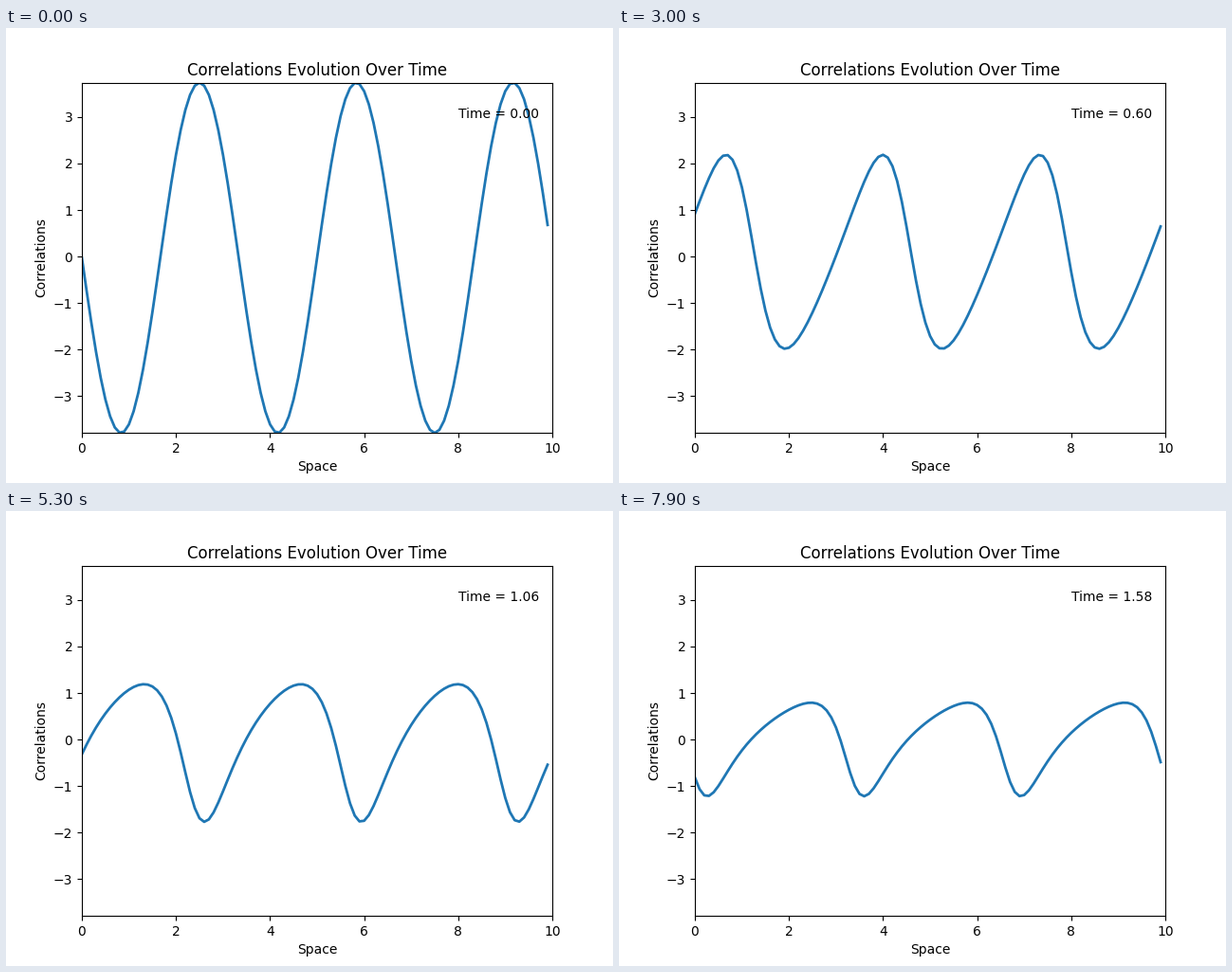
A matplotlib script that plays this animation: 640x480 px, repeating every 8 s.

```python
import numpy as np
import matplotlib.pyplot as plt
from matplotlib.animation import FuncAnimation

FRAMES, INTERVAL, DT = 80, 100, 0.02
WAVE = 2 * np.pi * 3 / 10          # three periods over a domain of length 10
AMP = 2 * WAVE
OFFSET = -0.028

x = np.arange(100) * 0.1


def wave(t):
    """Travelling wave whose profile breathes between narrow dips and narrow peaks."""
    swing = np.exp(-1.1 * t) * np.cos(2 * np.pi * t / 0.55)
    height = AMP / 1.64 * np.exp(-0.57 * t) * (1 + 0.64 * swing)
    skew = 0.33 * (1 - swing) + 0.025 * t

    # tilt > 0 sharpens the troughs, tilt < 0 the crests
    omega = 2 * np.pi / 0.6
    tilt = min(1.5, 0.8 + 2.5 * np.exp(-3.2 * t)) * np.cos(omega * (t - 0.43))
    front = 2 * t - 1.6 * t * np.exp(-4 * t) * np.cos(omega * (t - 0.38))

    # Moebius warp of the phase, placed so the falling edge sits at the front
    squeeze = (1 - skew) / (1 + skew)
    lag = 2 * np.arctan(squeeze * np.tan(tilt / 2))
    w = np.exp(1j * (WAVE * (x - front) - lag))
    warped = (w - skew) / (1 - skew * w)
    shape = (1j * np.exp(1j * tilt) * (warped + skew)).real
    return height * shape + OFFSET * np.exp(-8 * t)


plt.rcParams["font.family"] = "DejaVu Sans"
fig, ax = plt.subplots(figsize=(6.4, 4.8), dpi=100)
line, = ax.plot(x, wave(0), color="#1f77b4", lw=2)
label = ax.text(8, 2.98, "Time = 0.00")
ax.set_xlim(0, 10)
ax.set_ylim(OFFSET - AMP, OFFSET + AMP)
ax.set_xlabel("Space")
ax.set_ylabel("Correlations")
ax.set_title("Correlations Evolution Over Time", pad=5.3)


def update(frame):
    t = frame * DT
    line.set_ydata(wave(t))
    label.set_text(f"Time = {t:.2f}")
    return line, label


anim = FuncAnimation(fig, update, frames=FRAMES, interval=INTERVAL,
                     repeat=True, repeat_delay=0, blit=False)
plt.show()
```
